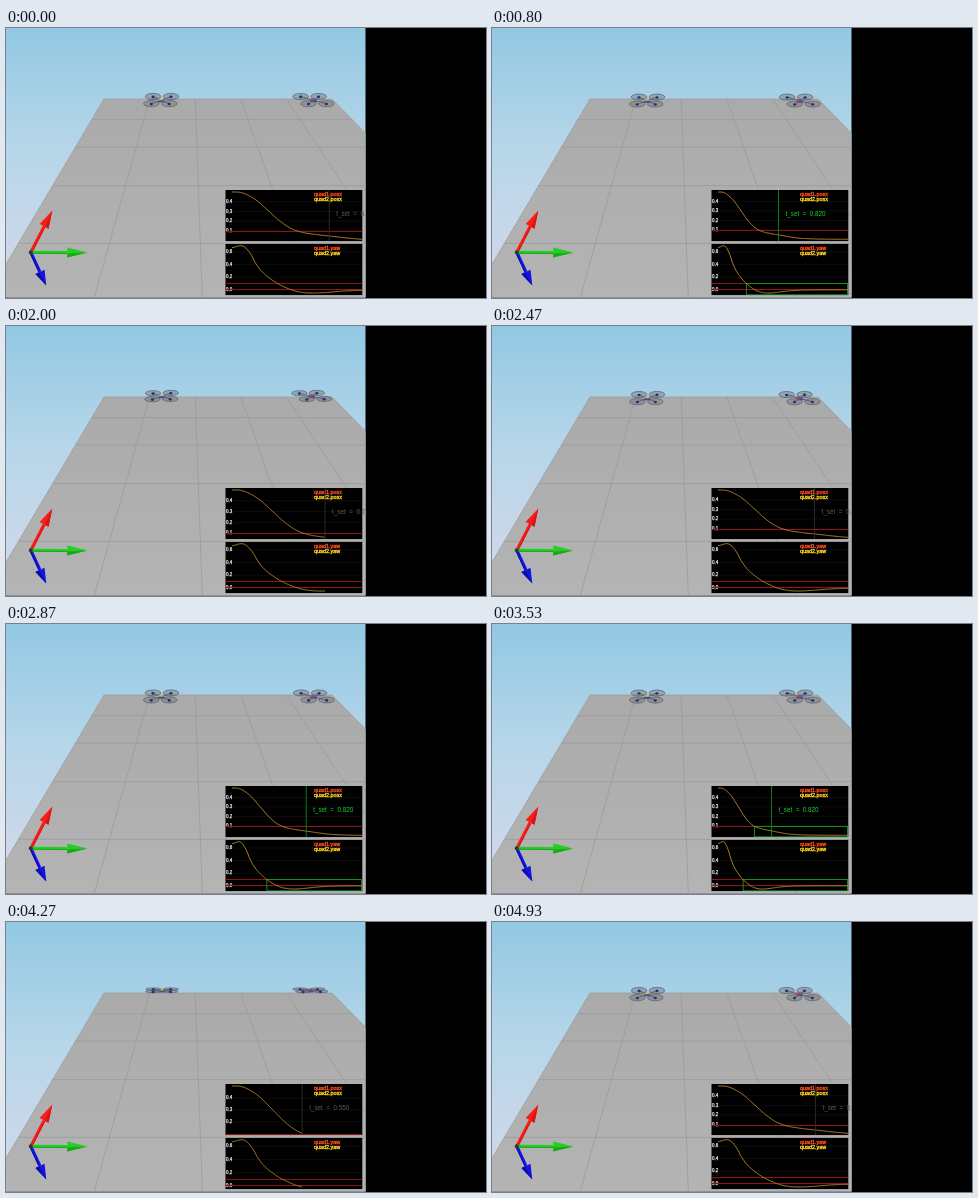
Write an HTML page with a canvas that moves like this. It is 480x270 px and loops after 4990 ms.

```html
<!DOCTYPE html>
<html lang="en">
<head>
<meta charset="utf-8">
<title>Two quadrotors settling</title>
<style>
  html, body { margin: 0; width: 100%; height: 100%; overflow: hidden; background: #000; }
  canvas { display: block; width: 480px; height: 270px; }
</style>
</head>
<body>
<canvas id="stage" width="480" height="270"></canvas>
<script>
const ctx = document.getElementById('stage').getContext('2d');
const LOOP = 4990, STEP = LOOP / 75, SIM_RATE = 1 / 1200;
const SETTLE = 0.82, FONT = '"Liberation Sans", Arial, sans-serif';
const VIEW = { w: 359.5, h: 269.5 }, VANISH = { x: 184, y: -74 };

// time, value
const POS = [[0, .5], [.09, .49], [.2, .42], [.3, .315], [.4, .205], [.49, .13], [.58, .088],
  [.72, .06], [.84, .044], [.98, .025], [1.12, .011], [1.4, .003], [2.2, 0]];
const YAW = [[0, .67], [.07, .7], [.11, .675], [.16, .56], [.2, .42], [.25, .295], [.31, .195],
  [.385, .1], [.48, .015], [.56, -.03], [.66, -.05], [.78, -.043], [.95, -.018], [1.15, -.004], [1.5, 0], [2.2, 0]];
const TILT = [[0, .39], [.15, .6], [.3, .4], [.44, .16], [.55, .14], [.72, .34], [.9, .41], [1.2, .39], [2.2, .39]];

// Cubic interpolation through a short list of points.
function sample(pts, t) {
  const last = pts.length - 1;
  if (t <= pts[0][0]) return pts[0][1];
  if (t >= pts[last][0]) return pts[last][1];
  let i = 0;
  while (t > pts[i + 1][0]) i++;
  const slope = j => {
    const a = pts[Math.max(0, j - 1)], b = pts[Math.min(last, j + 1)];
    return j === 0 || j === last ? 0 : (b[1] - a[1]) / (b[0] - a[0]);
  };
  const [t0, v0] = pts[i], [t1, v1] = pts[i + 1];
  const h = t1 - t0, u = (t - t0) / h, w = 1 - u;
  return v0 * (1 + 2 * u) * w * w + slope(i) * h * u * w * w
    + v1 * u * u * (3 - 2 * u) - slope(i + 1) * h * u * u * w;
}

function simTime(ms) {
  if (ms < 1132) return 1.097 + ms * SIM_RATE;
  return Math.max(0, ms - (ms < 3605 ? 1137 : 3610)) * SIM_RATE;
}

function line(x0, y0, x1, y1, color, width = 1) {
  ctx.strokeStyle = color;
  ctx.lineWidth = width;
  ctx.beginPath();
  ctx.moveTo(x0, y0);
  ctx.lineTo(x1, y1);
  ctx.stroke();
}

function polygon(pts, fill) {
  ctx.fillStyle = fill;
  ctx.beginPath();
  pts.forEach(p => ctx.lineTo(p[0], p[1]));
  ctx.fill();
}

function ellipse(x, y, rx, ry, fill, stroke) {
  ctx.beginPath();
  ctx.ellipse(x, y, rx, ry, 0, 0, 7);
  ctx.fillStyle = fill;
  ctx.fill();
  if (stroke) {
    ctx.strokeStyle = stroke;
    ctx.lineWidth = .7;
    ctx.stroke();
  }
}

function label(str, x, y, size, color, weight = 0) {
  ctx.font = `${size}px ${FONT}`;
  ctx.textBaseline = 'middle';
  ctx.fillStyle = ctx.strokeStyle = color;
  ctx.fillText(str, x, y);
  if (weight) {
    ctx.lineWidth = weight;
    ctx.strokeText(str, x, y);
  }
}

function vertical(y0, y1, ...colors) {
  const g = ctx.createLinearGradient(0, y0, 0, y1);
  colors.forEach((c, i) => g.addColorStop(i / (colors.length - 1), c));
  return g;
}

function drawFloor() {
  ctx.fillStyle = vertical(0, 240, '#92c8e3', '#b6d6e9', '#cfd8ea');
  ctx.fillRect(0, 0, 360, 270);
  const along = (x, y) => VANISH.x + (x - VANISH.x) * (y - VANISH.y) / (71 - VANISH.y);
  const tile = (326 - 98) / 5;
  polygon([[98, 71], [326, 71], [along(326, 270), 270], [along(98, 270), 270]],
    vertical(71, 270, '#aaaaaa', '#b4b4b4'));
  for (let i = 0; i <= 5; i++) {
    const x = 98 + i * tile;
    line(x, 71, along(x, 270), 270, '#989898', .7);
  }
  for (let i = 0; i < 5; i++) {
    const y = VANISH.y + 1 / (1 / 145 - i * .00086);
    line(along(98, y), y, along(326, y), y, '#989898', .7);
  }
}

function arrow(dx, dy, head, color, dark) {
  const len = Math.hypot(dx, dy);
  ctx.save();
  ctx.translate(24.8, 224.2);
  ctx.rotate(Math.atan2(dy, dx));
  line(0, 0, len - head, 0, color, 3);
  line(0, 1, len - head, 1, dark, 1);
  polygon([[len - head, -5], [len, 0], [len - head, 5]], color);
  polygon([[len - head, 1], [len, 0], [len - head, 5]], dark);
  ctx.restore();
}

function drawAxes() {
  arrow(15.5, 33.3, 15, '#1414e0', '#0b0bb0');
  arrow(21.5, -41.8, 18, '#f81c1c', '#d81414');
  arrow(56.5, .3, 20, '#22cf22', '#18a818');
  ellipse(24.8, 224.2, 2, 2, '#283c28');
}

function drawDrone(homeX, t, accent) {
  const pos = sample(POS, t), yaw = sample(YAW, t), tilt = sample(TILT, t);
  const cy = 72.6 - 42 * pos;
  const scale = (cy - VANISH.y) / 147;
  const cx = VANISH.x + (homeX - VANISH.x) * scale;
  const lean = (homeX - VANISH.x) / 115;
  const rotors = [];
  for (let i = 0; i < 4; i++) {
    const a = yaw + Math.PI * (i / 2 + .25), r = 12.8 * scale;
    const dy = Math.sin(a) * r * tilt;
    rotors.push([cx + Math.cos(a) * r + lean * dy, cy + dy]);
  }
  rotors.sort((a, b) => a[1] - b[1]);
  for (const [x, y] of rotors) line(cx, cy + .5, x, y, '#5c6070', 1.1);
  ctx.fillStyle = '#3448c0';
  ctx.fillRect(cx - 3, cy, 6, 2.2);
  ctx.fillStyle = accent;
  ctx.fillRect(cx - 3, cy - 1.6, 5, 1.8);
  for (const [x, y] of rotors) {
    ellipse(x, y, 7.8 * scale, Math.max(1.2, 7.8 * tilt * scale), 'rgba(112,116,122,.45)', '#5c5f64');
    ellipse(x, y + .4, 1.6, 1.3, '#28307a');
  }
}

function drawPlot(p, t) {
  const { top, height, name } = p;
  const span = Math.max(1, t), left = 226, right = 356, bottom = top + height;
  ctx.save();
  ctx.beginPath();
  ctx.rect(219.5, top, 136.8, height);
  ctx.clip();
  ctx.fillStyle = '#000';
  ctx.fillRect(219, top, 138, height);

  const low = Math.min(p.max - .02, p.floor(t));
  const toX = s => left + (right - left) * s / span;
  const toY = v => top + 2 + 47.3 * (p.max - v) / (p.max - low);
  const snap = v => Math.floor(toY(v)) + .5;
  for (const v of p.ticks) {
    const y = toY(v);
    if (y > bottom - 2) continue;
    line(left + 2, y, right, y, '#161616', .6);
    label(v.toFixed(1), 220, y, 4.5, '#e8e8e8', .25);
  }
  for (const v of p.reds) line(219, snap(v), 357, snap(v), '#8c1616');

  if (t > p.boxFrom) {
    const y = snap(p.reds[0]);
    ctx.strokeStyle = '#0b9c22';
    ctx.lineWidth = .9;
    ctx.strokeRect(toX(p.enter), y, right - .5 - toX(p.enter), bottom - .5 - y);
  }

  ctx.strokeStyle = '#cc922c';
  ctx.lineWidth = .85;
  ctx.beginPath();
  for (let i = 0; i <= 140; i++) {
    const s = t * i / 140;
    ctx.lineTo(toX(s), toY(sample(p.data, s)));
  }
  ctx.stroke();
  label(`quad1.${name}`, 308, top + 4.5, 5.4, '#ff4a1c', .35);
  label(`quad2.${name}`, 308, top + 9.6, 5.4, '#ffd820', .35);
  ctx.restore();
}

const plots = [
  { name: 'posx', top: 162, height: 51.3, data: POS, max: .5, ticks: [.4, .3, .2, .1], reds: [.095],
    enter: .56, boxFrom: 1.84, floor: t => sample(POS, t) },
  { name: 'yaw', top: 215.7, height: 51.6, data: YAW, max: .7, ticks: [.6, .4, .2, 0], reds: [.1, 0],
    enter: .385, boxFrom: 1.25, floor: t => sample(YAW, Math.min(t, .66)) }
];

function drawMarker(t) {
  const set = Math.min(t, SETTLE), x = 226 + 130 * set / Math.max(1, t);
  const done = t > 1.25;
  const shown = Math.ceil(set * 100) / 100;
  line(x, 162, x, 213, done ? '#0b8c1e' : '#2c322c', .9);
  label(`t_set  =  ${shown.toFixed(3)}`, x + 7, 186.5, 6.3, done ? '#16d030' : '#5c5c4c');
}

function draw(ms) {
  const t = simTime(ms);
  ctx.fillStyle = '#000';
  ctx.fillRect(0, 0, 480, 270);
  ctx.save();
  ctx.beginPath();
  ctx.rect(0, 0, VIEW.w, VIEW.h);
  ctx.clip();
  drawFloor();
  drawAxes();
  drawDrone(155, t, '#d4b838');
  drawDrone(308.3, t, '#d04040');
  plots.forEach(p => drawPlot(p, t));
  drawMarker(t);
  ctx.restore();
}

const start = performance.now();
function tick() {
  const ms = (performance.now() - start) % LOOP;
  draw(Math.floor((ms + 5) / STEP) % 75 * STEP);
  requestAnimationFrame(tick);
}
tick();
</script>
</body>
</html>
```
